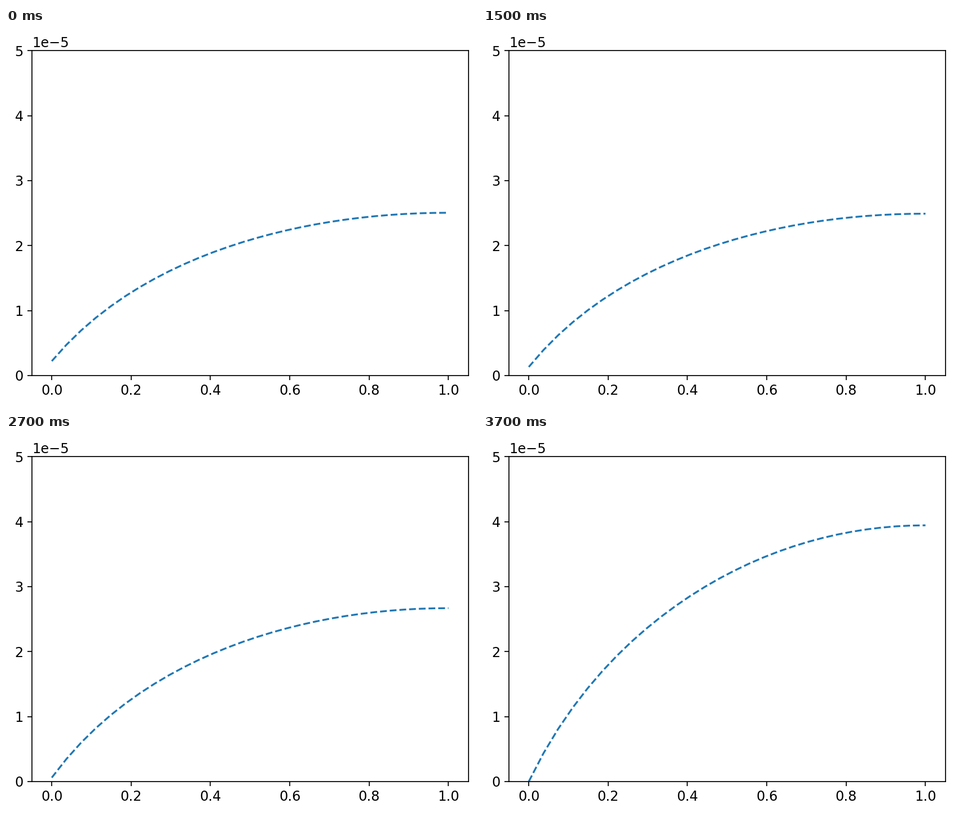
These frames come from a looping animation (835 px wide and 671 px high, 3800 ms). A matplotlib script:

```python
import numpy as np
import matplotlib.pyplot as plt
from matplotlib.animation import FuncAnimation

WIDTH, HEIGHT, DPI = 835, 671, 144
FRAMES, INTERVAL = 38, 100
LEFT, RIGHT, TOP, BOTTOM = 46, 819.6, 40.2, 616.9
Y_MAX = 5e-5
SCALE = 13 / 12

plt.rcParams.update({
    "font.family": "DejaVu Sans",
    "font.size": 12,
    "axes.linewidth": 0.8 * SCALE,
    "lines.linewidth": 1.5 * SCALE,
})
for axis in ("xtick", "ytick"):
    plt.rcParams.update({
        f"{axis}.major.size": 3.5 * SCALE,
        f"{axis}.major.width": 0.8 * SCALE,
        f"{axis}.major.pad": 3.5 * SCALE,
    })

fig = plt.figure(figsize=(WIDTH / DPI, HEIGHT / DPI), dpi=DPI)
ax = fig.add_axes([LEFT / WIDTH, 1 - BOTTOM / HEIGHT,
                   (RIGHT - LEFT) / WIDTH, (BOTTOM - TOP) / HEIGHT])
ax.set_xlim(-0.05, 1.05)
ax.set_ylim(0, Y_MAX)

x = np.linspace(0, 1, 28)
line, = ax.plot([], [], "--", color="#1f77b4")

# Right-hand level: slow decline, sharp rise, overshoot, settling.
LEVEL_FRAMES = [0, 19, 22, 24, 25, 26, 27, 28, 29, 30, 31, 32, 33, 34, 35, 36, 37]
LEVELS = np.array([2.505, 2.487, 2.488, 2.506, 2.535, 2.59, 2.668, 2.755, 2.87,
                   3.038, 3.797, 4.10, 4.137, 4.08, 4.01, 3.948, 3.943]) * 1e-5


def profile(frame):
    start = 6e-8 * (FRAMES - 1 - frame)
    end = np.interp(frame, LEVEL_FRAMES, LEVELS)
    rise = np.clip((end - 2.5e-5) / 1.3e-5, 0, 1)
    strength = 0.49 - 0.11 * rise
    width = 0.41 - 0.10 * rise
    deficit = (1 - x) ** 2 * (1 - strength * x / (x + width))
    return end - (end - start) * deficit


def update(frame):
    line.set_data(x, profile(frame))
    return line,


anim = FuncAnimation(fig, update, frames=FRAMES, interval=INTERVAL,
                     init_func=lambda: update(0), repeat=True, repeat_delay=0)
plt.show()
```
